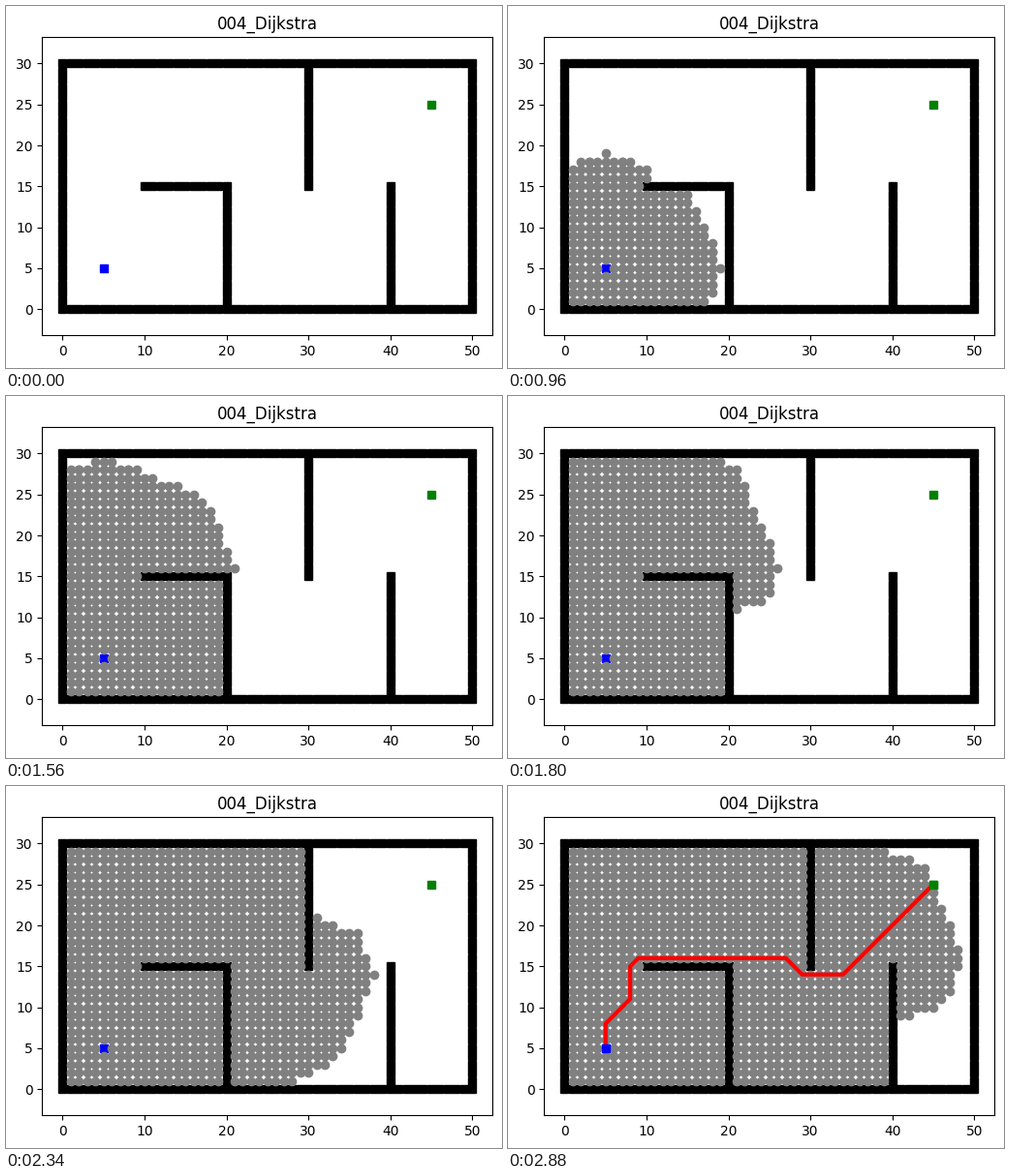
A matplotlib script that plays this animation: 512x374 px, repeating every 2940 ms.

```python
import math

import matplotlib.pyplot as plt
from matplotlib.animation import FuncAnimation

W, H, DPI = 512, 374, 100
START, GOAL = (5, 5), (45, 25)
MOVES = [(-1, 0), (-1, 1), (0, 1), (1, 1), (1, 0), (1, -1), (0, -1), (-1, -1)]


def build_walls():
    walls = {(x, y) for x in range(51) for y in (0, 30)}
    walls |= {(x, y) for x in (0, 50) for y in range(31)}
    walls |= {(x, 15) for x in range(10, 21)}
    walls |= {(20, y) for y in range(15)}
    walls |= {(30, y) for y in range(15, 30)}
    walls |= {(40, y) for y in range(16)}
    return walls


def blocked(a, b, walls):
    """A step may not enter a wall or cut past a wall's corner."""
    return b in walls or (a[0], b[1]) in walls or (b[0], a[1]) in walls


def dijkstra(walls):
    cost, parent = {START: 0.0}, {START: START}
    queue, closed = {(0.0, START)}, []
    while queue:
        item = min(queue)
        queue.remove(item)
        node = item[1]
        closed.append(node)
        if node == GOAL:
            break
        for dx, dy in MOVES:
            nxt = (node[0] + dx, node[1] + dy)
            if blocked(node, nxt, walls):
                continue
            new = cost[node] + math.hypot(dx, dy)
            if new < cost.get(nxt, math.inf):
                cost[nxt], parent[nxt] = new, node
                queue.add((new, nxt))
    path = [GOAL]
    while path[-1] != START:
        path.append(parent[path[-1]])
    return closed, path


def snapshots(total):
    """Visited counts to show: the search speeds up in three stages."""
    counts = [0]
    for n in range(1, total + 1):
        step = 20 if n < total / 3 else 30 if n < total * 2 / 3 else 40
        if n % step == 0:
            counts.append(n)
    if counts[-1] != total:
        counts.append(total)
    return counts


walls = build_walls()
closed, path = dijkstra(walls)
visited = [p for p in closed if p not in (START, GOAL)]
shots = snapshots(len(visited))
shots.append(shots[-1])  # last one adds the path

fig = plt.figure(figsize=(W / DPI, H / DPI), dpi=DPI)
ax = fig.add_axes([37.34 / W, 33.72 / H, 465 / W, 308 / H])
half = 27.5 * 308 / 465
ax.set(xlim=(-2.5, 52.5), ylim=(15 - half, 15 + half),
       xticks=range(0, 51, 10), yticks=range(0, 31, 5))
ax.set_title("004_Dijkstra")

ax.plot(*START, "bs")
ax.plot(*GOAL, "gs")
ax.plot(*zip(*sorted(walls)), "sk")
seen, = ax.plot([], [], "o", color="gray")
overlay = [
    ax.plot(*zip(*path), color="r", linewidth=3)[0],
    ax.plot(*START, "bs")[0],
    ax.plot(*GOAL, "gs")[0],
]


def update(i):
    pts = visited[:shots[i]]
    seen.set_data([p[0] for p in pts], [p[1] for p in pts])
    for line in overlay:
        line.set_visible(i == len(shots) - 1)
    return [seen, *overlay]


anim = FuncAnimation(fig, update, frames=len(shots), interval=60,
                     repeat=True, repeat_delay=0)
plt.show()
```
